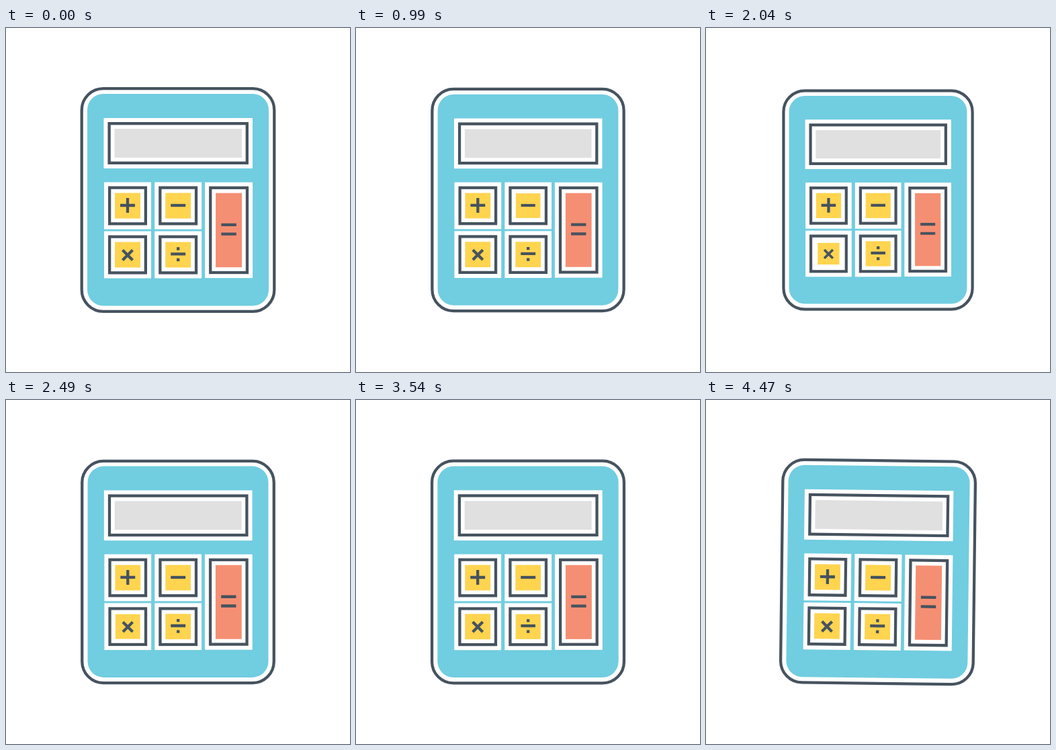
Write an HTML page that moves like this. It is 512x512 px and loops after 4500 ms.

```html
<!DOCTYPE html>
<html lang="en">
<head>
<meta charset="utf-8">
<title>Calculator</title>
<style>
html, body { margin: 0; width: 100%; height: 100%; overflow: hidden; background: #fff; }
svg { display: block; width: 100%; height: 100%; }
.line { fill: none; stroke: #46535f; stroke-width: 4.3; }
</style>
</head>
<body>
<svg viewBox="0 0 512 512">
  <g id="body">
    <rect class="line" x="112.7" y="90.2" width="286.6" height="331.6" rx="32" style="fill:#fff"/>
    <rect x="121" y="98" width="270" height="315.5" rx="24" fill="#71cde0"/>
  </g>
</svg>
<script>
const LOOP = 4500;
const body = document.getElementById('body');

function add(parent, tag, attrs) {
  const el = document.createElementNS('http://www.w3.org/2000/svg', tag);
  for (const name in attrs) el.setAttribute(name, attrs[name]);
  return parent.appendChild(el);
}

function box(parent, w, h, attrs) {
  return add(parent, 'rect', { x: -w / 2, y: -h / 2, width: w, height: h, ...attrs });
}

// White plate, dark frame and a coloured core that can shrink on its own.
function panel(x, y, w, h, fill, sign = '') {
  const g = add(body, 'g', { transform: `translate(${x} ${y})` });
  box(g, w, h, { fill: '#fff' });
  box(g, w - 16.3, h - 16.3, { class: 'line' });
  const core = add(g, 'g', {});
  box(core, w - 32, h - 32, { fill });
  add(core, 'path', { d: sign, class: 'line' });
  return core;
}

panel(256.2, 171.5, 221.5, 75, '#e0e0e0');

const key = (x, y, sign) => panel(x, y, 70, 70, '#ffd44f', sign);
const presses = [
  { start: 0, end: 900, core: key(181, 264.5, 'M-11 -.5H11M0 -11.5V10.5') },
  { start: 900, end: 1650, core: key(256.2, 264.5, 'M-11 -.5H11') },
  { start: 1650, end: 2590, core: key(181, 337.5, 'M-7.5 -7L7.5 8M7.5 -7L-7.5 8') },
  { start: 2850, end: 3600, core: key(256.2, 337.5, 'M-11 -1.2H11M-2.2 -9H2.2M-2.2 7.5H2.2') },
  { start: 3600, end: 4350, still: true,
    core: panel(331.6, 300.9, 71, 142.5, '#f58f73', 'M-11.2 -8H11.2M-11.2 5.8H11.2') }
];

function pulse(t, start, end) {
  if (t <= start || t >= end) return 0;
  return Math.sin(Math.PI * (t - start) / (end - start)) ** 1.5;
}

function draw(now) {
  const t = now % LOOP;
  let scale = 1;
  for (const { start, end, still, core } of presses) {
    const p = pulse(t, start, end);
    core.setAttribute('transform', `scale(${1 - 0.14 * p})`);
    if (!still) scale -= 0.02 * p;
  }
  const turn = t > 3600 ? -1.75 * Math.sin((t - 3600) / 450 * 2 * Math.PI) : 0;
  body.setAttribute('transform',
    `translate(256 256) rotate(${turn}) scale(${scale}) translate(-256 -256)`);
  requestAnimationFrame(() => draw(performance.now()));
}
draw(0);
</script>
</body>
</html>
```
